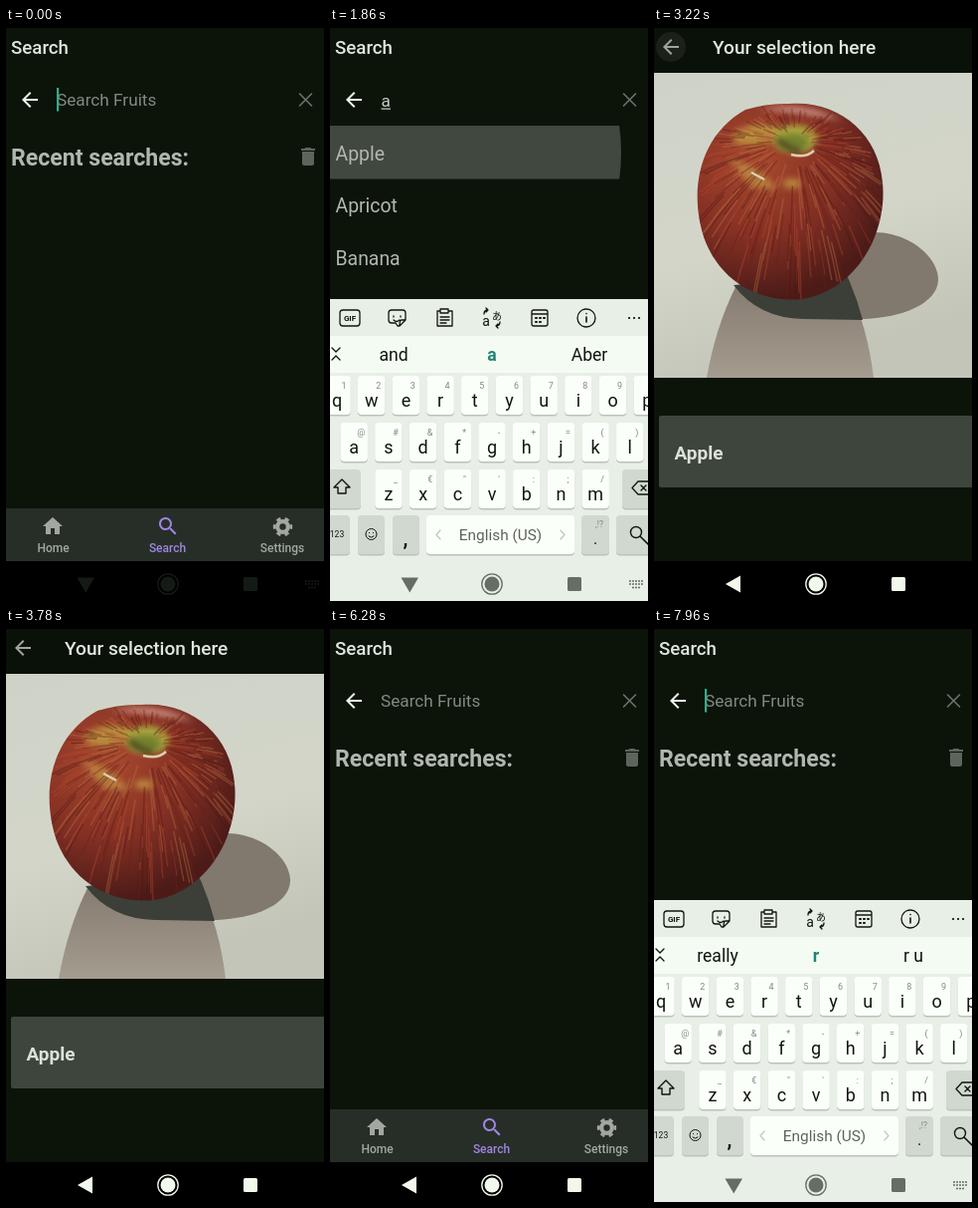
Write an HTML page that moves like this. It is 320 by 575 pixels and loops after 8000 ms.

```html
<!DOCTYPE html>
<html lang="en">
<head>
<meta charset="utf-8">
<title>Fruit search</title>
<style>
  html, body { margin: 0; width: 100%; height: 100%; overflow: hidden; background: #0c1409; }
  svg { display: block; }
  text { font-family: Roboto, "Noto Sans CJK JP", sans-serif; white-space: pre; }
</style>
</head>
<body>
<svg id="stage" width="320" height="575" viewBox="0 0 320 575"></svg>
<script>
const LOOP = 8000, STEP = 140;
const ICON = {
  back: 'M20 11H7.83l5.59-5.59L12 4l-8 8 8 8 1.41-1.41L7.83 13H20v-2z',
  home: 'M10 20v-6h4v6h5v-8h3L12 3 2 12h3v8z',
  find: 'M15.5 14h-.8l-.3-.3A6.5 6.5 0 1 0 13.7 14.4l.3.3v.8l5 5 1.5-1.5zm-6 0a4.5 4.5 0 1 1 0-9 4.5 4.5 0 0 1 0 9z',
  bin: 'M6 19c0 1.1.9 2 2 2h8c1.1 0 2-.9 2-2V7H6v12zM19 4h-3.5l-1-1h-5l-1 1H5v2h14V4z'
};

const text = (x, y, size, str, fill, more = '') =>
  `<text x="${x}" y="${y}" font-size="${size}" fill="${fill}" ${more}>${str}</text>`;
const mid = (x, y, size, str, fill, more = '') => text(x, y, size, str, fill, 'text-anchor="middle" ' + more);
const rect = (x, y, w, h, fill, r = 0) =>
  `<rect x="${x}" y="${y}" width="${w}" height="${h}" rx="${r}" fill="${fill}"/>`;
const icon = (name, x, y, fill) => `<path d="${ICON[name]}" transform="translate(${x} ${y})" fill="${fill}"/>`;
const line = (d, color, w = 1.3) =>
  `<path d="${d}" fill="none" stroke="${color}" stroke-width="${w}" stroke-linecap="round" stroke-linejoin="round"/>`;
const group = (id, body) => `<g id="${id}">${body}</g>`;
const medium = 'font-weight="500"', bold = 'font-weight="700"';

function searchScreen() {
  const list = ['Apple', 'Apricot', 'Banana'].map((s, i) => text(5.5, 132.5 + i * 52.5, 19.4, s, '#b2b8b0')).join('');
  const tab = '#a2a8a1', purple = '#9f86e2';
  return rect(0, 0, 320, 575, '#0c1409')
    + text(5, 25.5, 18.7, 'Search', '#dfe6dd', medium)
    + icon('back', 12, 60, '#eef5ec')
    + line('M295.500 66l12 12m0-12l-12 12', '#6c736b', 1.6)
    + group('hint', text(51, 78, 17.2, 'Search Fruits', '#838982'))
    + group('cursor', rect(51, 60, 2.2, 23.5, '#3aa88c'))
    + group('recent', text(5, 138, 23.1, 'Recent searches:', '#b0b7ae', bold) + icon('bin', 292, 117, '#5d645c'))
    + group('saved', text(5.5, 186, 19.4, 'Apple', '#a9afa7'))
    + group('typed', text(51.500, 78.5, 17.2, 'a', '#c8cec6') + rect(51.5, 80.5, 9.5, 1.2, '#c8cec6')
      + '<circle id="ripple" cx="100" cy="125" fill="#fff" clip-path="url(#row)"/>' + list)
    + rect(0, 482, 320, 53, '#272e27')
    + icon('home', 35, 488, tab) + icon('find', 151, 488, purple)
    + `<g fill="none" stroke="${tab}"><circle cx="278.500" cy="500.500" r="5.300" stroke-width="4.200"/>
       <circle cx="278.500" cy="500.500" r="8.300" stroke-width="2.800" pathLength="12" stroke-dasharray="1" stroke-dashoffset=".5"/></g>`
    + mid(47.5, 526, 12, 'Home', tab, medium) + mid(162.5, 526, 12, 'Search', purple, medium)
    + mid(278, 526, 12, 'Settings', tab, medium);
}

function applePicture() {
  let seed = 7;
  const rnd = () => (seed = seed * 16807 % 2147483647) / 2147483647;
  const tones = ['#4e1713', '#b54a30', '#6b2019', '#bf7446'];
  const at = (x, y) => x.toFixed(1) + ' ' + y.toFixed(1);
  let streaks = '';
  // Pencil strokes fan out from the stem and follow the round skin.
  for (let i = 0; i < 320; i++) {
    const a = rnd() * Math.PI * 2, c = Math.cos(a), s = Math.sin(a);
    const from = 0.15 + rnd() * 0.6, to = from + 0.15 + rnd() * 0.25;
    const point = r => at(141 - 5 * r + (95 * r + 35 * r * (1 - r)) * c, 113 + 62 * r + 98 * r * s);
    streaks += `<path d="M${point(from)}Q${point((from + to) / 2)} ${point(to)}" stroke="${tones[i % 4]}"/>`;
  }
  const shape = 'M136 76C185 72 226 105 230 155C235 205 205 262 150 272C110 276 70 258 52 215C35 170 42 110 92 82Q115 75 136 76Z';
  return `<defs>
    <linearGradient id="paper" x2=".3" y2="1"><stop stop-color="#cfd3c7"/><stop offset=".6" stop-color="#d3d5c9"/><stop offset="1" stop-color="#c4c5b9"/></linearGradient>
    <radialGradient id="skin" gradientUnits="userSpaceOnUse" cx="102" cy="132" r="140"><stop stop-color="#a94a2f"/><stop offset=".55" stop-color="#853024"/><stop offset="1" stop-color="#4c1b18"/></radialGradient>
    <linearGradient id="shade" x2="0" y2="1"><stop stop-color="#857b70"/><stop offset="1" stop-color="#a59c90"/></linearGradient>
    <clipPath id="photo"><path d="M0 45h320v306H0z"/></clipPath><clipPath id="fruit"><path d="${shape}"/></clipPath>
    <filter id="soft"><feGaussianBlur stdDeviation="3"/></filter></defs>
    <g clip-path="url(#photo)">${rect(0, 45, 320, 306, 'url(#paper)')}
    <path d="M222 205C255 205 285 228 286 252C286 276 250 292 205 292L180 262Z" fill="#81786e"/>
    <path d="M82 260Q62 300 53 351H221Q215 300 195 258Z" fill="url(#shade)"/>
    <path d="M80 258Q105 291 150 292L210 293Q204 270 194 248Z" fill="#3c3e38"/>
    <path d="${shape}" fill="url(#skin)"/>
    <g clip-path="url(#fruit)"><g filter="url(#soft)"><ellipse cx="104" cy="107" rx="25" ry="10" fill="#b98f3e" transform="rotate(-8 104 107)"/>
    <ellipse cx="142" cy="111" rx="23" ry="14" fill="#a7a33c"/>
    <path d="M76 132Q105 136 124 162L98 160Z" fill="#b8803e"/>
    <ellipse cx="139" cy="156" rx="10" ry="5" fill="#b8853c"/>
    <path d="M105 82Q150 73 190 93Q146 83 105 82Z" fill="#d9a99b"/></g>
    <g fill="none" stroke-width="1.500" opacity=".38">${streaks}</g></g>
    <g filter="url(#soft)"><ellipse cx="140" cy="115" rx="16" ry="9" fill="#75802f"/>
    <path d="M124 111Q132 121 148 124" stroke="#302719" stroke-width="5" fill="none"/></g>
    <path d="M138 127Q153 131 161 123M98 145l13 7" stroke="#dccdb0" stroke-width="2.500" fill="none"/></g>`;
}

function detailPage() {
  return rect(0, 0, 320, 535, '#0c1409') + rect(0, 0, 320, 45, '#0a1108')
    + '<circle id="tap" cx="17" cy="19" r="15" fill="#fff"/>'
    + icon('back', 5, 7, '#a0a69e') + text(59, 25.5, 19.1, 'Your selection here', '#e0e7de', medium)
    + applePicture() + rect(5, 389, 320, 72, '#3d453d', 2)
    + text(20.5, 433, 19, 'Apple', '#dce2da', bold);
}

function keyboard() {
  const ink = '#10160f', pale = '#828a81', dark = '#d1d8cf';
  const key = (x, y, w, fill = '#fbfffa') => rect(x, y + 1.5, w, 39, '#bcc3ba', 4) + rect(x, y, w, 39, fill, 4);
  const row = (x0, y, letters, marks) => [...letters].map((c, i) => {
    const x = x0 + i * 34.7;
    return key(x - 13.7, y, 27.4) + mid(x, y + 31, 18, c, ink) + mid(x + 7, y + 12.5, 9, marks[i], pale);
  }).join('');
  const tools = line('M13 283h14q3 0 3 3v10q0 3-3 3H13q-3 0-3-3v-10q0-3 3-3z', ink)
    + mid(20, 294, 8, 'GIF', ink, bold)
    + line('M62 283h11q3 0 3 3v7l-6 6h-2l-2-3h-4q-3 0-3-3v-7q0-3 3-3zM76 293h-4q-2 0-2 6M64 289v1m7-1v1m-7 3q3 3 6 0', ink)
    + line('M110 284h-2v15h15v-15h-3M111 282h8v4h-8zM111 290h9m-9 3h9m-9 3h6', ink)
    + mid(157, 299, 14, 'a', ink) + mid(168, 293, 10, 'あ', ink)
    + line('M155 287q0-4 4-4m-2-2l2 2-2 2M171 295q0 4-4 4m2-2l-2 2 2 2', ink)
    + line('M205 283h12q2 0 2 2v12q0 2-2 2h-12q-2 0-2-2v-12q0-2 2-2zM203 287h16', ink)
    + line('M207 291h1m3 0h1m3 0h1m-9 4h1m3 0h1', ink, 2)
    + '<circle cx="258" cy="291" r="9" fill="none" stroke="' + ink + '" stroke-width="1.300"/>'
    + line('M258 290v5M258 286.500v.1', ink, 1.6) + line('M301 291h.1m4.900 0h.1m4.900 0h.1', ink, 2.2);
  const words = ['left', 'middle', 'right'].map((id, i) =>
    mid([64, 163, 261][i], 334, 17.6, '', i === 1 ? '#228474' : ink, `id="${id}" ` + (i === 1 ? bold : ''))).join('');
  return rect(0, 272, 320, 303, '#e8efe6') + rect(0, 309, 320, 37, '#f3fbf2') + tools
    + line('M2 321l4 4 4-4M2 333l4-4 4 4', ink) + words
    + row(7, 349, 'qwertyuiop', '1234567890') + row(24.2, 396, 'asdfghjkl', '@#&*-+=()')
    + row(59, 443, 'zxcvbnm', '_€"\':;/')
    + key(-8, 443, 39, dark) + line('M12 453l-8 8h4v6h8v-6h4z', ink, 1.4)
    + key(294, 443, 40, dark) + line('M310 455h14v13h-14l-6-6.500zM313 459l5 5m0-5l-5 5', ink)
    + key(-8, 489, 28, dark) + mid(7, 511, 8.5, '123', ink)
    + key(28, 489, 27, dark) + '<circle cx="41.500" cy="508" r="5.500" fill="none" stroke="' + ink + '"/>'
    + line('M39.500 506.500v.2m4-.2v.2M39 510q2.500 2.500 5 0', ink, 1)
    + key(63, 489, 27, dark) + mid(76, 519, 20, ',', ink, bold)
    + key(97, 489, 149) + mid(171.5, 514, 15.4, 'English (US)', '#5c645b')
    + line('M111 504l-4 4.500 4 4.500M232 504l4 4.500-4 4.500', '#c2c9c0')
    + key(253, 489, 28, dark) + mid(267, 518, 16, '.', ink) + mid(271, 501, 8.5, ',!?', pale)
    + key(288, 489, 44, dark) + '<circle cx="308" cy="506" r="5.500" fill="none" stroke="' + ink + '" stroke-width="1.400"/>'
    + line('M312 510l8 8', ink, 1.6);
}

const navIcons = () => '<path id="arrow"/><circle cx="163" cy="558" r="7.500"/>'
  + '<circle cx="163" cy="558" r="10.200" fill="none" stroke="currentColor" stroke-width="1.300"/>'
  + rect(239, 551, 14, 14, 'currentColor', 1.5)
  + '<path id="dots" d="M301 555h15M301 558h15M304 561.500h9" stroke="currentColor" stroke-width="1.500" stroke-dasharray="2 1"/>';

const stage = document.getElementById('stage');
stage.innerHTML = '<defs><clipPath id="row"><path d="M0 98h320v53.500H0z"/></clipPath></defs>'
  + searchScreen() + rect(0, 535, 320, 40, '#000') + group('page', detailPage())
  + group('keys', keyboard()) + group('nav', navIcons());

const ui = {};
stage.querySelectorAll('[id]').forEach(el => ui[el.id] = el);
const show = (id, on) => ui[id].setAttribute('opacity', +on);
const shift = (id, y) => ui[id].setAttribute('transform', `translate(0 ${y})`);

function snap(t) {
  const start = [6700, 3220, 1860, 0].find(s => t >= s);
  return start + Math.floor((t - start) / STEP) * STEP;
}

function draw(now) {
  const real = now % LOOP, t = snap(real);
  const ramp = (a, b) => Math.min(1, Math.max(0, (t - a) / (b - a)));
  const typed = t >= 840 && t < 2600, closed = t >= 2600 && t < 6700;

  show('typed', typed);
  show('hint', !typed);
  show('recent', !typed);
  show('cursor', t < 840 || t >= 6700);
  show('saved', t >= 2600 && real < 5700);
  ui.ripple.setAttribute('r', t < 1860 ? 0 : 193 + (t - 1860) * 0.4);
  show('ripple', 0.22 * (1 - ramp(2000, 2420)));

  const page = ramp(2280, 2560) - ramp(3780, 4200);
  show('page', page);
  shift('page', 30 * (1 - page));
  show('tap', 0.14 * (ramp(3080, 3360) - ramp(3500, 3780)));

  const up = ramp(0, 420) - ramp(2600, 2840) + ramp(6700, 7120);
  show('keys', up);
  shift('keys', 43 * (1 - up));
  const words = typed || t >= 2600 && t < 2840 ? ['and', 'a', 'Aber']
    : real >= 7680 ? ['really', 'r', 'r u'] : ['The', 'I', 'I\'m'];
  ['left', 'middle', 'right'].forEach((id, i) => ui[id].textContent = words[i]);

  const color = closed ? (t < 2840 ? '#b9c1b8' : '#f2f8ec') : up ? '#656d64' : '#141b14';
  ui.nav.setAttribute('fill', color);
  ui.nav.setAttribute('color', color);
  ui.arrow.setAttribute('d', closed ? 'M72 558L87 549.500V566.500Z' : 'M71.500 551.500H89L80.250 566.500Z');
  show('dots', !closed);
}

const begin = performance.now();
(function tick() {
  draw(performance.now() - begin);
  requestAnimationFrame(tick);
})();
</script>
</body>
</html>
```
